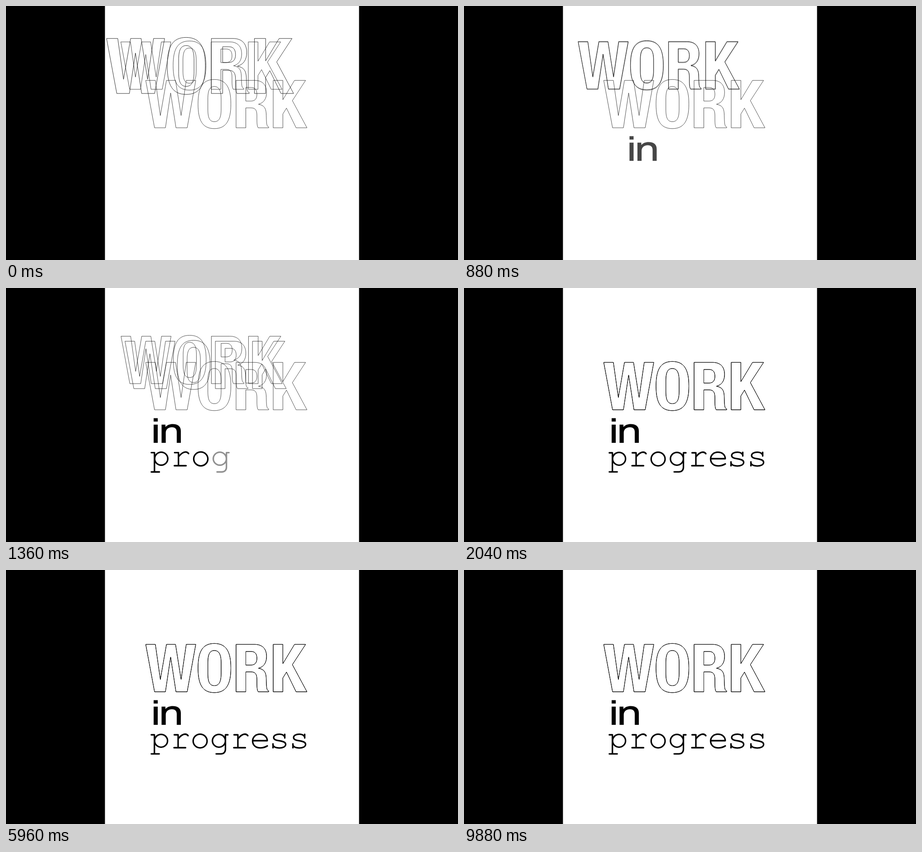
An HTML page with a canvas for the animation above (10 s loop, 998 by 561 pixels).

```html
<!DOCTYPE html>
<html lang="en">
<head>
<meta charset="utf-8">
<title>Work in progress</title>
<style>
  html, body { margin: 0; width: 100%; height: 100%; overflow: hidden; background: #000; }
  canvas { display: block; }
</style>
</head>
<body>
<canvas id="stage" width="998" height="561" role="img" aria-label="WORK in progress"></canvas>
<script>
const ctx = document.getElementById('stage').getContext('2d');
const LOOP = 10000, STEP = 40;
const PAGE = { x: 218.5, y: 0, w: 561, h: 561 };
const CENTER = { x: 486.5, y: 216.5 };

const work = new Path2D(
  // W
  'M308.5 164.3H329.8L340.8 242L354.3 164.3H374.3L386.6 242L398 164.3H419L400 269H375.3L363.5 192L352 269H328Z' +
  // O
  'M460 162.3C486 162.3 496.5 180 496.5 216.5C496.5 253 486 270.8 460 270.8C434 270.8 424 253 424 216.5C424 180 434 162.3 460 162.3Z' +
  'M460 177.8C449 177.8 445.7 188 445.7 205V228C445.7 246 449 255.5 460 255.5C471 255.5 475 246 475 228V205C475 188 471 177.8 460 177.8Z' +
  // R
  'M508 164.3H549C567 164.3 575.3 175 575.3 191C575.3 205 569 214 557.5 217C569 219 574 225 574.5 238C575 251 575 259 576.3 263C577 265.5 578.5 266.5 580 267.3V269H556.8C554.5 265.5 554 259 554 251V242C554 230 550.5 225 541 225H529.5V269H508Z' +
  'M529.5 180V210H540.5C549.5 210 554 205 554 195C554 185.5 550 180 541.5 180Z' +
  // K
  'M590 164.3H611.3V207L637 164.3H661.5L632.3 209L664.5 269H640.5L619.3 225.5L611.3 238.5V269H590Z'
);

const inWord = new Path2D(
  'M326 287.5H335V295H326ZM326 301.7H335V342H326Z' +
  'M343.5 301.7H352V307C356 302.6 361.5 300.5 368 300.5C380 300.5 386 306 386 316V342H377V318C377 311 373 307.5 366.5 307.5C358 307.5 352.7 312.5 352.7 320V342H343.5Z'
);

// Monoline letters, drawn from the left end of the baseline
const ORIGIN = { x: 318.5, y: 393 }, PITCH = 44;
const glyphs = {
  p: 'M2.3 -29H9.2V13.1M2.3 13.1H19.8M38.2 -15.8A14.3 14.1 0 1 1 9.6 -15.8A14.3 14.1 0 1 1 38.2 -15.8Z',
  r: 'M9 -29H17.5V-.5M8.5 -.5H34M17.5 -20C23 -27 29 -30.5 33 -30.5C36 -30.5 38 -29 39.5 -27',
  o: 'M37.5 -15.3A15.4 15.1 0 1 1 6.7 -15.3A15.4 15.1 0 1 1 37.5 -15.3Z',
  g: 'M39.5 -29H34V3C34 9 30 13.1 24 13.1H13.5M33.9 -15.8A14.3 14.1 0 1 1 5.3 -15.8A14.3 14.1 0 1 1 33.9 -15.8Z',
  e: 'M6 -16H38.3C38.3 -25 31 -30.3 22 -30.3C13 -30.3 6 -24 6 -15.5C6 -6 13 -.1 23 -.1C29 -.1 34.5 -2 38.5 -4.5',
  s: 'M33 -30V-22M33 -24C31 -28.5 26 -30.3 21 -30.3C14 -30.3 8.5 -27.5 8.5 -23C8.5 -18 14 -17 21 -15.8C29 -14.5 35 -13 35 -8C35 -2.5 28.5 .1 21 .1C14.5 .1 9 -2 7 -6M7 -9V-.3'
};
const letters = [...'progress'].map(c => new Path2D(glyphs[c]));

// Rows: time, x offset, y offset, scale
const zoomTrack = [
  [0, -58, -84.2, 1.16],
  [440, -58, -84.2, 1.16],
  [640, -58, -84.2, 1.8],
  [880, -56.6, -86, 1],
  [1160, -77, -81.6, 1],
  [1720, 0, 0, 1]
];
const driftTrack = [
  [0, -55, -85, 1],
  [400, -59, -89, 1],
  [880, -56.2, -84.9, 1],
  [1160, -64.6, -66, 1],
  [1720, 0, 0, 1]
];

const clamp = v => Math.min(1, Math.max(0, v));
const progress = (t, start, length) => clamp((t - start) / length);
const smooth = u => u * u * (3 - 2 * u);
const remain = u => (1 - u) ** 3;

function sample(track, t) {
  const i = track.findIndex(row => row[0] > t);
  if (i < 0) return track[track.length - 1].slice(1);
  const a = track[i - 1], b = track[i];
  const u = smooth((t - a[0]) / (b[0] - a[0]));
  return a.slice(1).map((v, k) => v + (b[k + 1] - v) * u);
}

function drawOutline([dx, dy, scale]) {
  ctx.save();
  ctx.translate(CENTER.x + dx, CENTER.y + dy);
  ctx.scale(scale, scale);
  ctx.translate(-CENTER.x, -CENTER.y);
  ctx.lineWidth = 0.7;
  ctx.stroke(work);
  ctx.restore();
}

function drawIn(t) {
  ctx.save();
  ctx.globalAlpha = progress(t, 640, 330);
  ctx.translate(420 * remain(progress(t, 640, 440)), 0);
  ctx.fill(inWord);
  ctx.restore();
}

function drawProgress(t) {
  const scale = 1 + 1.58 * remain(progress(t, 1080, 352));
  ctx.save();
  ctx.translate(ORIGIN.x, ORIGIN.y);
  ctx.scale(scale, scale);
  ctx.lineWidth = 3.3;
  ctx.lineCap = ctx.lineJoin = 'round';
  for (const [i, letter] of letters.entries()) {
    ctx.globalAlpha = progress(t, 1080 + 80 * i, 92);
    ctx.stroke(letter);
    ctx.translate(PITCH, 0);
  }
  ctx.restore();
}

function draw(t) {
  ctx.fillStyle = '#000';
  ctx.fillRect(0, 0, 998, 561);
  ctx.fillStyle = '#fff';
  ctx.fillRect(PAGE.x, PAGE.y, PAGE.w, PAGE.h);
  ctx.save();
  ctx.beginPath();
  ctx.rect(PAGE.x, PAGE.y, PAGE.w, PAGE.h);
  ctx.clip();
  ctx.fillStyle = ctx.strokeStyle = '#000';
  drawOutline([0, 0, 1]);
  drawOutline(sample(zoomTrack, t));
  drawOutline(sample(driftTrack, t));
  drawIn(t);
  drawProgress(t);
  ctx.restore();
}

function tick() {
  const t = performance.now() % LOOP;
  draw(Math.floor(t / STEP) * STEP);
  requestAnimationFrame(tick);
}
tick();
</script>
</body>
</html>
```
